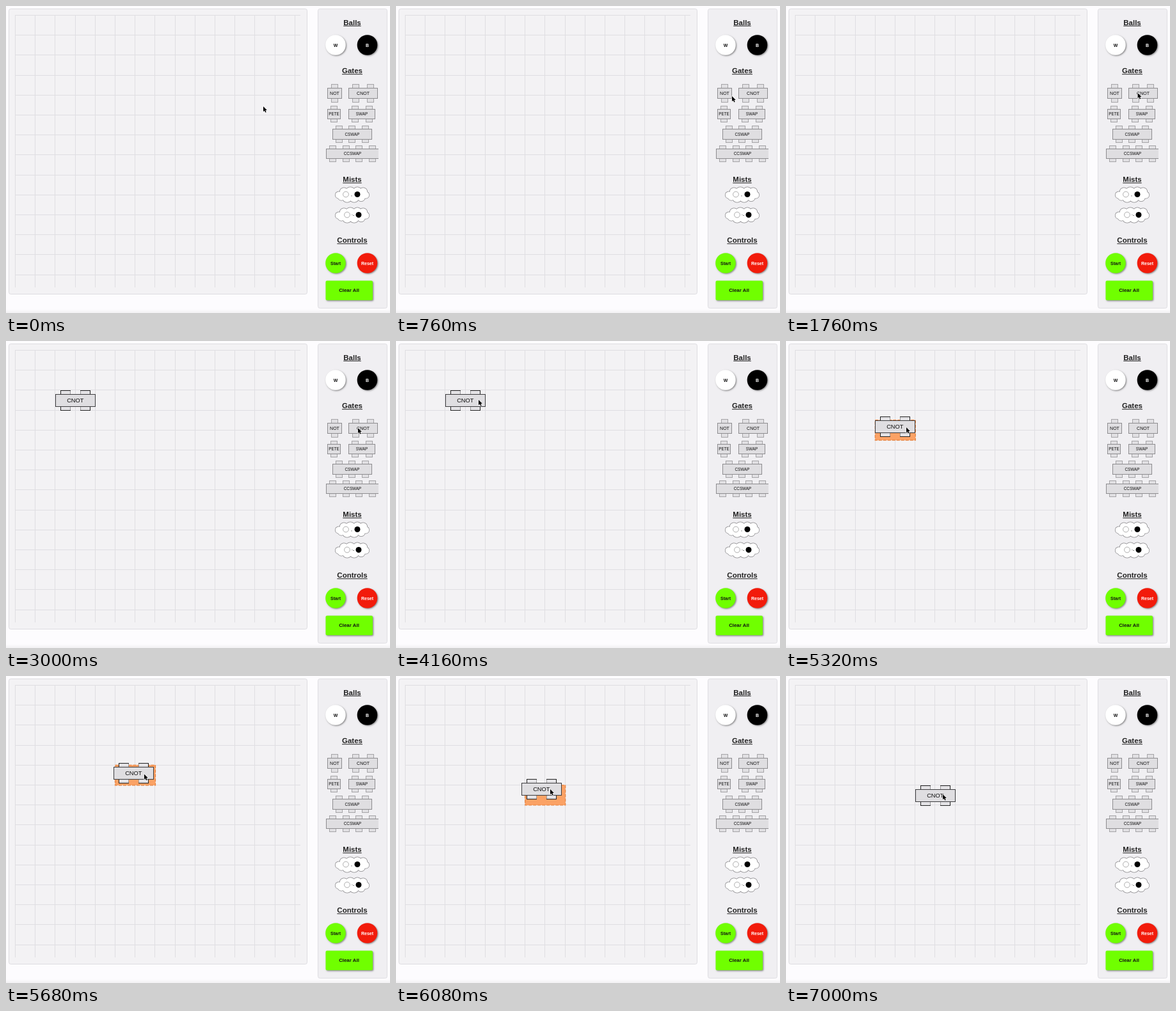
An HTML page with a canvas that plays this animation: 600 px wide and 480 px high, repeating every 7.24 s.

```html
<!DOCTYPE html>
<html lang="en">
<head>
<meta charset="utf-8">
<title>Gate board</title>
<style>
html, body { margin: 0; width: 100%; height: 100%; overflow: hidden; background: #fdfcfe; }
canvas { display: block; width: 600px; height: 480px; }
</style>
</head>
<body>
<canvas id="stage" width="600" height="480"></canvas>
<script>
const ctx = document.getElementById('stage').getContext('2d');
const FONT = '"Liberation Sans", Arial, sans-serif';
const LOOP = 7240, STEP = 40;
const ORIGIN = 14.5, CELL = 31.2;
const SPAWN = 2560, GRAB = 4800, DROP = 6800, LAG = 50;
const HOLD = { x: 44, y: 14 };

// Pointer stops: time, x, y
const STOPS = [
  [0, 402, 157], [760, 525, 141], [1520, 547, 137], [1600, 549, 136],
  [2000, 550, 136], [3280, 550, 136], [4040, 153, 95], [4160, 129, 92],
  [4480, 121, 91], [4760, 121, 91], [5320, 188, 135], [5520, 203, 144],
  [6080, 241, 177], [6280, 242.5, 183], [7000, 245, 185], [LOOP, 245, 185]
];

const slope = (i, c) => (STOPS[i + 1][c] - STOPS[i][c]) / (STOPS[i + 1][0] - STOPS[i][0]);

// Harmonic mean keeps the curve from overshooting its stops
function tangent(i, c) {
  if (i === 0 || i === STOPS.length - 1) return 0;
  const a = slope(i - 1, c), b = slope(i, c);
  return a * b > 0 ? 2 * a * b / (a + b) : 0;
}

function pointerAt(t) {
  let i = 0;
  while (i < STOPS.length - 2 && t >= STOPS[i + 1][0]) i++;
  const span = STOPS[i + 1][0] - STOPS[i][0];
  const u = (t - STOPS[i][0]) / span, v = 1 - u;
  const coord = c =>
    STOPS[i][c] * (1 + 2 * u) * v * v + STOPS[i + 1][c] * u * u * (3 - 2 * u) +
    span * u * v * (tangent(i, c) * v - tangent(i + 1, c) * u);
  return { x: coord(1), y: coord(2) };
}

const gridPos = n => ORIGIN + n * CELL;
const snap = v => gridPos(Math.round((v - ORIGIN) / CELL * 2 + 0.15) / 2);

function box(x, y, w, h, fill, line) {
  ctx.fillStyle = fill;
  ctx.fillRect(x, y, w, h);
  if (line) {
    ctx.strokeStyle = line;
    ctx.lineWidth = 1;
    ctx.strokeRect(x + 0.5, y + 0.5, w - 1, h - 1);
  }
}

function rounded(x, y, w, h, r, fill, line) {
  ctx.beginPath();
  ctx.roundRect(x, y, w, h, r);
  ctx.fillStyle = fill;
  ctx.fill();
  if (line) {
    ctx.strokeStyle = line;
    ctx.lineWidth = 1;
    ctx.stroke();
  }
}

function disc(x, y, r, fill, line) {
  ctx.beginPath();
  ctx.arc(x, y, r, 0, Math.PI * 2);
  ctx.fillStyle = fill;
  ctx.fill();
  if (line) {
    ctx.strokeStyle = line;
    ctx.lineWidth = 0.6;
    ctx.stroke();
  }
}

function label(text, x, y, size, color = '#111', weight = '') {
  ctx.font = `${weight} ${size}px ${FONT}`;
  ctx.textAlign = 'center';
  ctx.fillStyle = color;
  ctx.fillText(text, x, y);
}

function heading(text, y) {
  label(text, 541, y, 11.5, '#222', 'bold');
  const w = ctx.measureText(text).width;
  ctx.fillRect(541 - w / 2, y + 1.2, w, 1);
}

function withShadow(draw) {
  ctx.save();
  ctx.shadowColor = 'rgba(0,0,0,.45)';
  ctx.shadowBlur = 2.5;
  ctx.shadowOffsetX = ctx.shadowOffsetY = 1.2;
  draw();
  ctx.restore();
}

function roundButton(text, x, y, fill, color) {
  withShadow(() => disc(x, y, 15.8, fill));
  label(text, x, y + 2.5, 7, color, 'bold');
}

function drawGrid() {
  rounded(4.5, 4.5, 466, 446, 3, '#f3f2f4', '#dddce0');
  ctx.fillStyle = '#dfdee2';
  for (let n = 0; n < 15; n++) ctx.fillRect(Math.floor(gridPos(n)), 14, 1, 426);
  for (let n = 0; n < 14; n++) ctx.fillRect(14, Math.floor(gridPos(n)), 446, 1);
}

// Panel gate: body box, tab height, tab offsets
function panelGate(text, x, y, w, h, tab, size, offsets) {
  for (const dx of offsets) {
    box(x + dx, y - tab, 11, tab + 1, '#e1e0e3', '#a5a4a7');
    box(x + dx, y + h - 1, 11, tab + 1, '#e1e0e3', '#a5a4a7');
  }
  box(x, y, w, h, '#dfdee1', '#8d8c8f');
  label(text, x + w / 2, y + h / 2 + size * 0.36, size);
}

const PUFFS = [
  [-21, 1, 6], [-13, -4, 7], [-3, -4, 8], [8, -5, 7], [17, -4, 7],
  [21, 1, 6], [14, 5, 6.5], [3, 5, 8], [-8, 5, 8], [-17, 4, 6]
];

function mist(x, y, shift, mark) {
  for (const [dx, dy, r] of PUFFS) disc(x + dx, y + dy, r, '#858487');
  for (const [dx, dy, r] of PUFFS) disc(x + dx, y + dy, r - 0.7, '#fff');
  disc(x - 10 + shift, y, 4.4, '#fff', '#777');
  disc(x + 8 + shift, y, 4.5, '#000');
  label(mark, x - 1 + shift, y + 2, 7);
}

function drawPanel() {
  rounded(487.5, 4.5, 108, 468, 3, '#f0eff2', '#dfdee2');
  heading('Balls', 29.5);
  heading('Gates', 105);
  heading('Mists', 275);
  heading('Controls', 370);

  roundButton('W', 515, 61, '#fff', '#111');
  roundButton('B', 564.5, 61, '#000', '#fff');

  panelGate('NOT', 502, 128, 23, 17, 6, 7, [6]);
  panelGate('CNOT', 535, 128, 46, 17, 6, 7, [6, 29]);
  panelGate('PETE', 502, 161, 21, 16, 5, 6.3, [5]);
  panelGate('SWAP', 535, 161, 42, 16, 5, 6.3, [5, 27]);
  panelGate('CSWAP', 510, 192, 62, 17, 5, 6.3, [5, 25, 46]);
  ctx.save();
  ctx.beginPath();
  ctx.rect(490, 210, 92, 40);
  ctx.clip();
  panelGate('CCSWAP', 500, 223, 83, 16, 5, 6.3, [5, 26, 46, 67]);
  ctx.restore();

  mist(541, 294.5, 0, ',');
  mist(541, 326.5, 2, '·-');

  roundButton('Start', 515, 402, '#70ff00', '#111');
  roundButton('Reset', 564.5, 402, '#f21b0b', '#fff');
  withShadow(() => rounded(499.5, 429.5, 73.5, 30.5, 2, '#70ff00'));
  label('Clear All', 536, 447.3, 7.8, '#111', 'bold');
}

function boardGate(x, y) {
  x = Math.round(x);
  y = Math.round(y);
  [8, 39].forEach((dx, i) => {
    const left = x + dx, outer = left + 0.5 + i * 15;
    box(left, y, 16, 7, '#e4e3e6', '#99989b');
    box(left, y + 25, 16, 7, '#e4e3e6', '#99989b');
    ctx.strokeStyle = '#222';
    ctx.lineWidth = 1;
    ctx.beginPath();
    for (const edge of [y + 0.5, y + 31.5]) {
      ctx.moveTo(left, edge);
      ctx.lineTo(left + 16, edge);
    }
    ctx.moveTo(outer, y);
    ctx.lineTo(outer, y + 32);
    ctx.stroke();
  });
  box(x, y + 6, 63, 20, '#dfdee1', '#3c3c3e');
  label('CNOT', x + 31.3, y + 19, 9.3);
}

function dropZone(x, y) {
  ctx.fillStyle = '#fba265';
  ctx.fillRect(x, y, 63, 31.5);
  ctx.strokeStyle = '#e5823f';
  ctx.lineWidth = 1.2;
  ctx.setLineDash([5, 2]);
  ctx.strokeRect(x, y, 63, 31.5);
  ctx.setLineDash([]);
}

function drawPointer({ x, y }) {
  ctx.beginPath();
  [[0, 0], [0, 8.3], [1.9, 6.6], [3.2, 9.6], [4.7, 9], [3.4, 6], [5.9, 5.9]]
    .forEach(([dx, dy]) => ctx.lineTo(x + dx, y + dy));
  ctx.closePath();
  ctx.strokeStyle = 'rgba(255,255,255,.85)';
  ctx.lineWidth = 1.1;
  ctx.stroke();
  ctx.fillStyle = '#000';
  ctx.fill();
}

function drawPage() {
  ctx.fillStyle = '#fdfcfe';
  ctx.fillRect(0, 0, 600, 480);
  const fade = ctx.createLinearGradient(0, 474, 0, 480);
  fade.addColorStop(0, '#fdfcfe');
  fade.addColorStop(1, '#f1f0f2');
  ctx.fillStyle = fade;
  ctx.fillRect(0, 474, 600, 6);
  drawGrid();
  drawPanel();
}

function drawGate(t) {
  if (t < SPAWN) return;
  if (t < GRAB) return boardGate(gridPos(2), gridPos(2));
  if (t >= DROP) return boardGate(gridPos(6), gridPos(5));
  const hand = pointerAt(t - LAG);
  const x = hand.x - HOLD.x, y = hand.y - HOLD.y;
  dropZone(snap(x), snap(y));
  boardGate(x, y);
}

function render(now) {
  const t = Math.floor(now % LOOP / STEP) * STEP;
  drawPage();
  drawGate(t);
  drawPointer(pointerAt(t));
}

let start;
function tick(now) {
  start ??= now;
  render(now - start);
  requestAnimationFrame(tick);
}
render(0);
requestAnimationFrame(tick);
</script>
</body>
</html>
```
